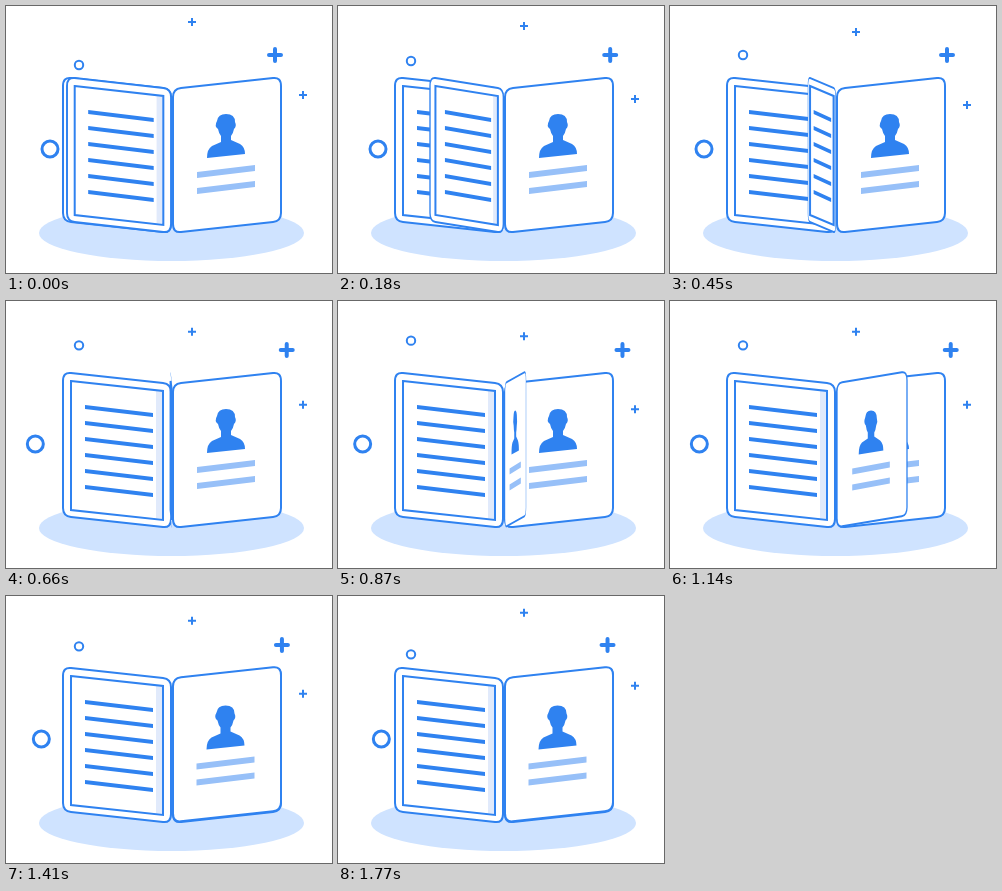
An HTML page that plays this animation: 326x267 px, repeating every 1.8 s.

```html
<!DOCTYPE html>
<html lang="en">
<head>
<meta charset="utf-8">
<title>Page turn</title>
<style>
  html, body { margin: 0; width: 100%; height: 100%; overflow: hidden; background: #fff; }
  svg { display: block; width: 326px; height: 267px; }
  .line { fill: none; stroke: #2f82f0; stroke-width: 2; }
  .page { fill: #fff; stroke: #2f82f0; stroke-width: 2; }
  .even { vector-effect: non-scaling-stroke; }
  .solid { fill: #2f82f0; }
  .pale { fill: #97c0f8; }
</style>
</head>
<body>
<svg viewBox="0 0 326 267">
  <defs>
    <path id="sheet" d="M57 80Q57 71 65 72L157 82Q165 83 165 91V218Q165 227 157 226L65 216Q57 215 57 207Z"/>
    <g id="left">
      <use href="#sheet" class="page even"/>
      <path d="M150 90L157 91V218L150 217Z" fill="#e1eafb"/>
      <path class="line even" d="M65 80L157 90V219L65 209Z"/>
      <path id="rows" class="solid"/>
    </g>
    <g id="info">
      <path class="solid" d="M211 115Q212 108 220 108Q229 108 229 116Q231 120 228 123Q227 128 225 130V134L234 138Q239 141 239 148L201 152Q201 143 206 140L215 136V130Q213 128 212 123Q208 120 211 115Z"/>
      <path class="pale" d="M191 166L249 159V165L191 172ZM191 182L249 175V181L191 188Z"/>
    </g>
    <use id="right" href="#sheet" class="page" transform="matrix(-1 0 0 1 332 0)"/>
  </defs>

  <ellipse cx="165.5" cy="227" rx="132.5" ry="28" fill="#cfe3ff"/>
  <use href="#left"/>
  <use href="#right"/>
  <use href="#info"/>
  <use id="leafLeft" href="#left"/>
  <g id="leafRight">
    <use href="#right" y="-.7"/>
    <use href="#info" x="-.5" y="1.5"/>
  </g>

  <path id="topPlus" class="line" d="M-4 0H4M0-4V4"/>
  <path id="sidePlus" class="line" d="M-4 0H4M0-4V4"/>
  <path id="bigPlus" class="line" d="M-6 0H6M0-6V6" style="stroke-width:4;stroke-linecap:round"/>
  <circle id="dot" class="line" r="4.2"/>
  <circle id="ring" class="line" r="8" style="stroke-width:3"/>
</svg>
<script>
const LOOP = 1800, STEP = 30;
const el = id => document.getElementById(id);
const place = (id, x, y) => el(id).setAttribute('transform', `translate(${x} ${y})`);

el('rows').setAttribute('d', Array.from({ length: 6 }, (_, i) => {
  const y = 104 + 16 * i;
  return `M79 ${y}l68 8v4l-68-8z`;
}).join(''));

// Leaf width over time: positive on the left side, negative on the right.
const turn = [[0, 105], [180, 74], [450, 28], [615, 5], [680, 0], [760, -5],
  [870, -21], [1140, -70], [1350, -105], [1410, -108], [LOOP, -108]];

function leafWidth(t) {
  const i = turn.findIndex(k => k[0] > t);
  const [t0, a] = turn[i - 1], [t1, b] = turn[i];
  return a + (b - a) * (t - t0) / (t1 - t0);
}

function showLeaf(id, scale, hinge) {
  el(id).setAttribute('visibility', scale > 0.01 ? 'visible' : 'hidden');
  el(id).setAttribute('transform', `matrix(${scale} 0 0 1 ${hinge * (1 - scale)} 0)`);
}

function draw() {
  const t = Math.floor(performance.now() % LOOP / STEP) * STEP;
  const w = leafWidth(t);
  showLeaf('leafLeft', Math.max(w, 0) / 109, 166);
  showLeaf('leafRight', Math.max(-w, 0) / 108, 167);

  const drift = 1 - Math.abs(1 - t / 900);
  place('topPlus', 186, 16 + 20 * drift);
  place('sidePlus', 297, 89 + 20 * drift);
  place('bigPlus', 269 + 16 * drift, 49);
  place('dot', 73, 59 - 20 * drift);
  place('ring', 44 - 20 * drift, 143);
  requestAnimationFrame(draw);
}
draw();
</script>
</body>
</html>
```
